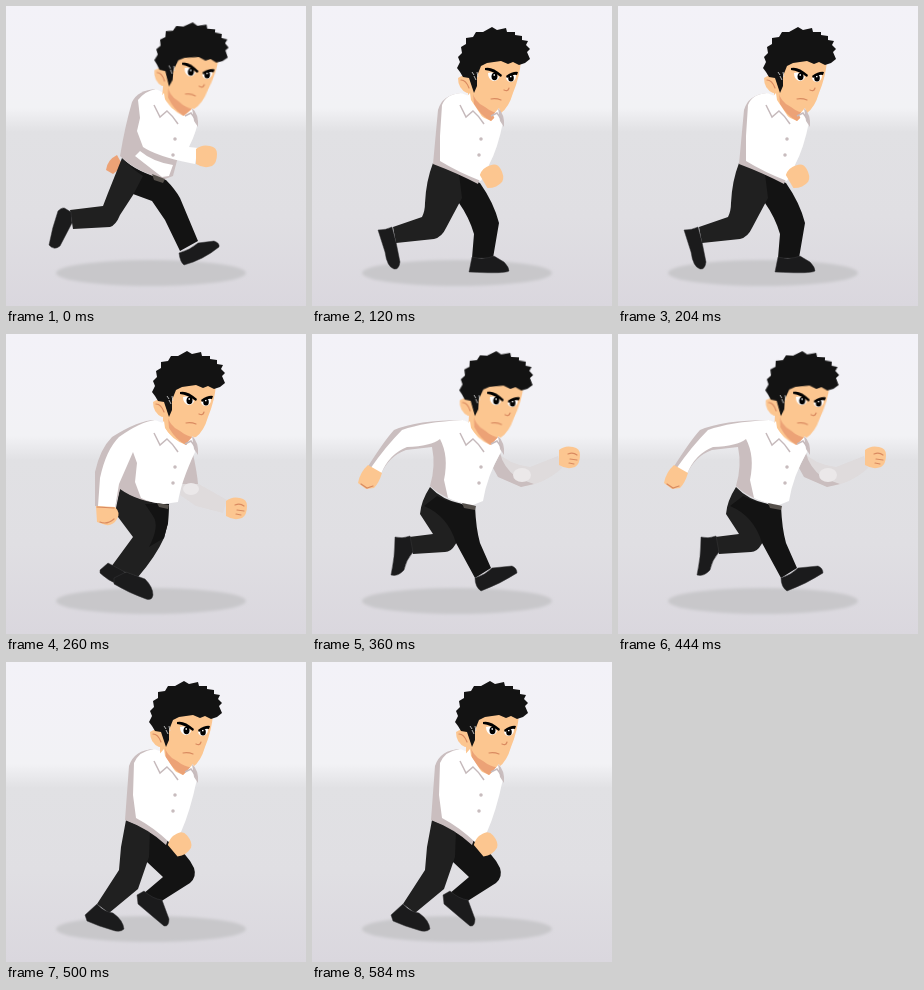
An HTML page without scripts for the animation above (640 ms loop, 300x300 px).

```html
<!DOCTYPE html>
<html lang="en">
<head>
<meta charset="utf-8">
<title>Running man</title>
<style>
  html, body { margin: 0; width: 100%; height: 100%; overflow: hidden; }
  svg { display: block; width: 100vw; height: 100vh; }
  .pose { visibility: hidden; animation: 640ms step-end infinite; }
  .push { animation-name: push; }
  .land { animation-name: land; }
  .pass { animation-name: pass; }
  .leap { animation-name: leap; }
  .drop { animation-name: drop; }
  .head { transform-origin: 180px 100px; animation: nod 640ms step-end infinite; }
  @keyframes push { 0% { visibility: visible } 18.75%, 100% { visibility: hidden } }
  @keyframes land { 18.75% { visibility: visible } 40.625%, 100% { visibility: hidden } }
  @keyframes pass { 40.625% { visibility: visible } 56.25%, 100% { visibility: hidden } }
  @keyframes leap { 56.25% { visibility: visible } 78.125%, 100% { visibility: hidden } }
  @keyframes drop { 78.125%, 100% { visibility: visible } }
  @keyframes nod {
    0% { transform: translate(-1.5px, -1px) rotate(5deg) }
    18.75% { transform: translate(-1px, 4px) }
    40.625% { transform: none }
    56.25% { transform: translateX(-1px) rotate(3deg) }
    78.125%, 100% { transform: translate(-3px, 2px) }
  }
  .shirt { fill: #fff; }
  .fold { fill: #cabebf; }
  .sleeve { fill: #dfdbdc; }
  .cuff { fill: #ebe8e9; }
  .belt { fill: #55504b; }
  .skin { fill: #fcc690; }
  .blush { fill: #eca276; }
  .near { fill: #131313; }
  .far { fill: #202020; }
  .shoe { fill: #1b1b1c; stroke: #39393b; stroke-width: .5; }
  .crease { fill: none; stroke: #d98a60; stroke-width: 1.2; stroke-linecap: round; }
</style>
</head>
<body>
<svg viewBox="0 0 300 300">
  <defs>
    <linearGradient id="room" x2="0" y2="1">
      <stop offset="0" stop-color="#f3f2f8"/>
      <stop offset=".34" stop-color="#f2f2f5"/>
      <stop offset=".42" stop-color="#e1e1e4"/>
      <stop offset=".7" stop-color="#e0dfe3"/>
      <stop offset="1" stop-color="#dad7de"/>
    </linearGradient>
    <filter id="soft" x="-10%" y="-50%" width="120%" height="200%"><feGaussianBlur stdDeviation="1.5"/></filter>
    <path id="fist" class="skin" d="M-10-7Q-4-12 4-10Q11-9 11-2Q11 7 6 10Q-2 13-10 8Z"/>
    <path id="knuckles" class="crease" d="M-1-3Q4-5 8-2M1 2L8 3M0 6L5 7"/>
  </defs>

  <rect width="300" height="300" fill="url(#room)"/>
  <ellipse cx="145" cy="267" rx="95" ry="13" fill="#c8c7ca" filter="url(#soft)"/>

  <g class="pose push">
    <path class="blush" d="M111 149Q101 154 100 164L107 168L117 160Z"/>
    <path class="near" d="M116 152Q130 166 160 174Q169 183 174 192L192 235L174 245L159 214L146 195L127 188Z"/>
    <path class="far" d="M116 152Q126 163 137 170L127 189L114 209Q110 219 104 221L67 223L64 204L97 200L102 187Z"/>
    <path class="shoe" d="M52 205Q57 200 60 203L65 206L66 217L54 240Q48 245 43 239Q46 222 52 205Z"/>
    <path class="shoe" d="M173 247Q184 244 192 237L208 235Q214 237 213 241Q197 254 178 259Q174 256 173 247Z"/>
    <path class="fold" d="M150 83Q132 84 126 96Q119 120 114 150Q130 166 159 173L167 170L180 120Z"/>
    <path class="shirt" d="M150 83Q139 85 132 94L134 112L131 125L137 141Q150 150 184 157L189 158L192 142L183 141Q191 125 192 114L185 101Z"/>
    <path class="shirt" d="M129 150L134 145Q147 156 167 159L163 170L156 171Z"/>
    <path class="belt" d="M146 168L159 173L157 177L148 174Z"/>
    <use href="#fist" x="200" y="150"/>
  </g>

  <g class="pose land">
    <path class="near" d="M121 157L168 177Q182 197 187 217L181 252L160 252L162 228Q157 211 147 197Z"/>
    <path class="far" d="M121 157L147 168L150 192L134 222Q130 231 122 233L84 237L81 221L110 211Q113 205 113 197Q114 175 121 157Z"/>
    <path class="shoe" d="M66 224Q74 224 80 221L84 236L88 256Q87 264 82 263Q75 261 73 246Z"/>
    <path class="shoe" d="M160 251Q172 254 182 250L192 256Q197 261 197 265Q193 268 157 266Z"/>
    <path class="fold" d="M149 87Q130 89 126 104L121 158Q145 167 166 178L180 130Z"/>
    <path class="shirt" d="M149 87Q134 88 130 99L128 130L128 155Q146 166 169 175L177 159Q186 142 191 116L187 102Z"/>
    <use href="#fist" transform="translate(180 170) rotate(-30)"/>
  </g>

  <g class="pose pass">
    <path class="sleeve" d="M178 132Q187 140 191 149L221 166L217 179L190 172L174 161Z"/>
    <path class="fold" d="M187 120Q191 138 192 150L174 150Z"/>
    <ellipse class="cuff" cx="185" cy="155" rx="8" ry="6"/>
    <g transform="translate(230 174)"><use href="#fist"/><use href="#knuckles"/></g>
    <path class="far" d="M114 154Q130 167 163 170L162 189L158 204Q150 222 132 243L105 233L127 203L109 179Z"/>
    <path class="near" d="M139 170L163 170L162 189L158 204L143 213Q154 192 147 182Z"/>
    <path class="shoe" d="M94 236L102 229L119 238L113 251Q101 246 94 239Z"/>
    <path class="shoe" d="M108 244L120 238L139 245Q147 253 147 261Q146 267 140 265Q123 259 108 250Z"/>
    <path class="fold" d="M149 86Q133 86 106 103Q94 115 89 138L89 172L109 174L114 155Q132 168 160 170L175 120Z"/>
    <path class="shirt" d="M149 86Q134 88 113 103Q100 116 94 144L92 172L109 174L113 150L127 118L131 129L129 148L135 164Q145 169 158 170L172 168Q175 148 189 118L187 101Z"/>
    <path class="belt" d="M151 169L163 171L162 175L153 173Z"/>
    <path class="skin" d="M90 172L109 173Q115 179 111 185Q107 192 100 191L91 188Z"/>
    <path class="crease" d="M91 173L108 174M94 188Q101 191 108 185"/>
  </g>

  <g class="pose leap">
    <path class="sleeve" d="M185 118Q196 130 218 133L246 122L250 134Q233 150 209 153L188 143Z"/>
    <path class="fold" d="M188 119Q191 133 205 144L222 150L209 153L186 143L181 134Z"/>
    <ellipse class="cuff" cx="210" cy="141" rx="9" ry="7"/>
    <g transform="translate(257 123)"><use href="#fist"/><use href="#knuckles"/></g>
    <path class="far" d="M118 153Q130 166 150 170L150 200L143 211Q139 218 133 218L101 220L97 203L121 200L108 180Q109 167 118 153Z"/>
    <path class="near" d="M125 162Q140 170 163 172Q164 195 168 209L179 234L163 244L144 209Q136 182 112 172Z"/>
    <path class="shoe" d="M83 203Q91 205 98 202L101 218Q94 226 92 236Q86 243 79 241Q83 223 83 203Z"/>
    <path class="shoe" d="M163 244Q173 241 180 234L200 232Q205 234 205 239Q188 250 169 257Q163 253 163 244Z"/>
    <path class="fold" d="M151 86Q105 86 82 96Q72 107 55 134L69 140Q77 122 94 116L120 113Q124 132 118 152Q132 166 160 171L180 118Z"/>
    <path class="shirt" d="M151 86Q112 88 90 96Q74 112 58 135L69 140Q77 120 95 113Q119 112 128 105Q137 122 132 146L136 164Q146 169 161 171L171 167Q175 142 189 118L187 101Z"/>
    <path class="belt" d="M150 169L164 172L163 176L152 174Z"/>
    <path class="skin" d="M56 131L70 139Q67 149 62 154L54 155L46 149Q48 138 56 131Z"/>
    <path class="crease" d="M49 150L55 154L61 152"/>
  </g>

  <g class="pose drop">
    <path class="near" d="M135 166L164 180Q181 191 188 206Q191 215 184 221L154 240L137 232L157 215L141 200Z"/>
    <path class="far" d="M120 158L144 168L143 195L132 227L103 251L91 242L113 208L115 185Z"/>
    <path class="shoe" d="M79 253L91 242Q98 250 107 251Q117 258 118 267Q114 271 106 268Q92 264 81 259Z"/>
    <path class="shoe" d="M131 233L138 229Q147 237 156 238L163 257Q163 265 158 264Q146 254 132 242Z"/>
    <path class="fold" d="M148 87Q128 88 123 104L119 158Q143 167 160 183L180 130Z"/>
    <path class="shirt" d="M148 87Q133 89 128 101L127 133L130 156Q147 165 163 180L175 170Q184 150 191 117L187 101Z"/>
    <use href="#fist" transform="translate(174 182) rotate(-40)"/>
  </g>

  <g class="head">
    <path class="skin" d="M157 78L157 92Q166 106 180 111L188 103L190 94Z"/>
    <path class="blush" d="M162 82L163 94Q170 106 180 111L188 103L190 94Z"/>
    <path class="skin" d="M168 46L210 50Q209 66 202 83Q198 97 190 103Q183 104 174 97Q163 92 161 80Z"/>
    <path class="skin" d="M161 68Q153 63 147 68Q147 79 156 83L163 82Z"/>
    <path class="crease" d="M150 70Q155 70 158 78"/>
    <path fill="#131313" d="M163 83L158 68L152 67L149 62L146 58L149 52L147 47L151 43L150 37L155 34L155 28L162 27L165 22L172 22L181 17L186 20L195 18L196 22L204 22L204 25L211 26L211 30L217 31L215 35L219 39L216 42L219 49L214 53L208 55L202 52L197 54L190 51L176 53L170 56L166 66L166 76Z"/>
    <path d="M163 66l2 4M166 62l1 5M161 62l2 3" stroke="#ddd" stroke-width=".8"/>
    <path d="M177 63Q183 61 188 67Q187 71 182 71Q177 69 177 63ZM195 68Q200 63 205 65Q205 71 200 72Q196 72 195 68Z" fill="#fff"/>
    <ellipse cx="183.500" cy="66.500" rx="3" ry="3.800"/>
    <ellipse cx="200" cy="68" rx="2.800" ry="3.600"/>
    <path d="M182.500 65h1.500M199 66.500h1.500" stroke="#fff" stroke-width="1.500"/>
    <path d="M174 58Q181 56 191 65L190 67Q182 61 174 60ZM195 66Q202 61 207 62L206 65Q201 64 196 68Z"/>
    <path class="crease" d="M193 80Q197 82 198 78M180 89Q185 88 190 90"/>
  </g>

  <g fill="none" stroke="#c6babc" stroke-width="1.500">
    <path class="shirt" d="M158 87L149 97L154 111L161 105L171 112L159 94Z" stroke="none"/>
    <path class="shirt" d="M181 109L187 102L190 113L185 117Z" stroke="none"/>
    <path class="fold" d="M186 102Q193 108 192 121L188 115Z" stroke="none"/>
    <path d="M148 99L154 111L161 105Q167 110 172 118M179 110L185 107L190 114"/>
    <circle cx="169" cy="133" r="1"/>
    <circle cx="167" cy="149" r="1"/>
  </g>
</svg>
</body>
</html>
```
